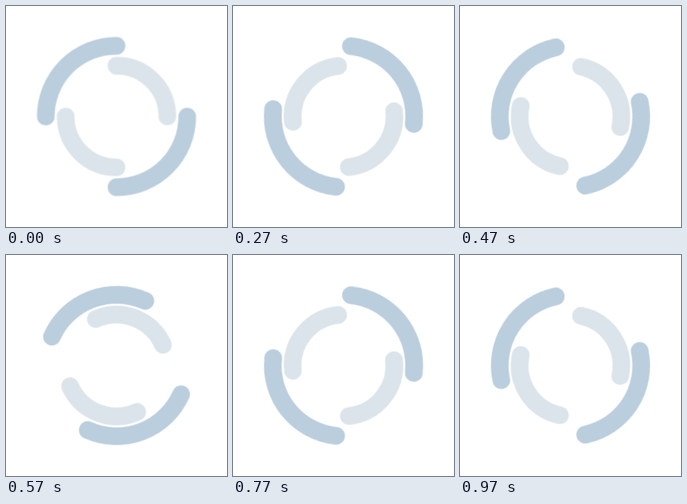
These frames come from a looping animation (277x277 px, 1000 ms). An HTML page:

```html
<!DOCTYPE html>
<html lang="en">
<head>
<meta charset="utf-8">
<title>Double ring loader</title>
<style>
  html, body { margin: 0; width: 100%; height: 100%; overflow: hidden; background: #fff; }
  svg { display: block; width: 100vw; height: 100vh; }
  path { fill: none; stroke-width: 8; stroke-linecap: round; transform-origin: 50px 50px; }
  #outer { stroke: #bbcedd; }
  #inner { stroke: #dce4eb; }
</style>
</head>
<body>
<svg viewBox="0 0 100 100">
  <path id="outer" d="M18 50A32 32 0 0 1 50 18M82 50A32 32 0 0 1 50 82"/>
  <path id="inner" d="M50 27A23 23 0 0 1 73 50M50 73A23 23 0 0 1 27 50"/>
</svg>
<script>
  const LOOP = 1000, STEPS = 30, TURN = 360;

  // Step times are snapped to 10 ms: 0, 30, 70, 100, ...
  const stepTime = k => Math.round(k * LOOP / STEPS / 10) * 10;

  function spin(id, dir) {
    const frames = Array.from({ length: STEPS + 1 }, (_, k) => ({
      offset: stepTime(k) / LOOP,
      transform: `rotate(${dir * k * TURN / STEPS}deg)`,
      easing: 'step-end'
    }));
    document.getElementById(id).animate(frames, { duration: LOOP, iterations: Infinity });
  }

  spin('outer', 1);
  spin('inner', -1);
</script>
</body>
</html>
```
